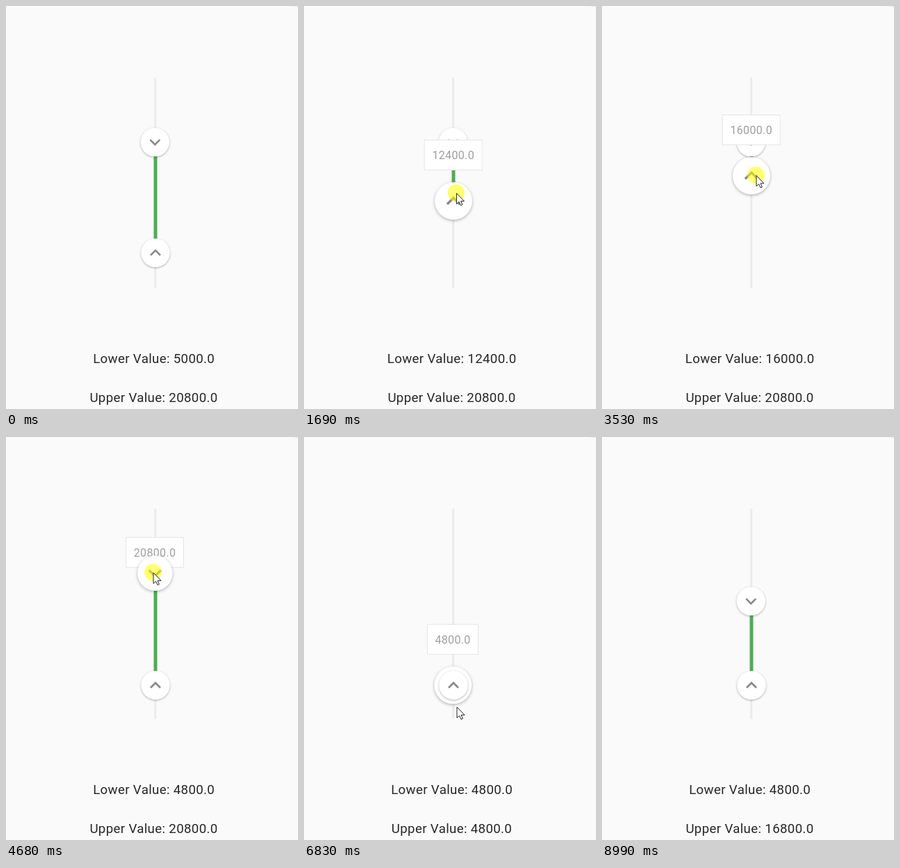
An HTML page for the animation above (9.31 s loop, 420 by 579 pixels).

```html
<!DOCTYPE html>
<html lang="en">
<head>
<meta charset="utf-8">
<title>Vertical range slider</title>
<style>
  html, body { margin: 0; width: 100%; height: 100%; overflow: hidden; background: #fafafa; }
  svg { display: block; width: 420px; height: 579px; }
  text { font-family: Roboto, Arial, sans-serif; text-anchor: middle; letter-spacing: .334px; }
  .label { font-size: 18.7px; fill: #282828; }
  .tip rect { fill: #fff; stroke: #e4e4e4; }
  .tip text { font-size: 16.03px; fill: #9e9e9e; }
  .knob circle { fill: #fff; filter: drop-shadow(0 1.3px 1.8px rgba(0, 0, 0, .3)); }
  .knob path { fill: none; stroke: #8a8a8a; stroke-width: 2.7; }
</style>
</head>
<body>
<svg viewBox="0 0 420 579">
  <path d="M409 0H420V2Z" fill="#eee"/>
  <rect x="213.2" y="103" width="3" height="302" fill="#eaebee"/>
  <rect id="range" x="212.5" width="5" fill="#4caf50"/>
  <g id="upper">
    <g class="tip"><rect y="-21.5" height="43"/><text y="6"></text></g>
    <g class="knob"><circle r="20.7"/><path d="M-7-3.5 0 3.5 7-3.5"/></g>
  </g>
  <g id="lower">
    <g class="tip"><rect y="-21.5" height="43"/><text y="6"></text></g>
    <g class="knob"><circle r="20.7"/><path d="M-7 3.5 0-3.5 7 3.5"/></g>
  </g>
  <text id="lowerLabel" class="label" x="212.7" y="513"></text>
  <text id="upperLabel" class="label" x="212.5" y="569"></text>
  <g id="cursor">
    <circle id="halo" r="12.3" cx="-.5" cy="-.5" fill="#ff0" opacity=".56"/>
    <path d="M0 0V15.5L3.6 12.3 6 17.6 8.4 16.6 6.1 11.4H11Z" fill="#fff" stroke="#222"/>
  </g>
</svg>
<script>
const LOOP = 9310, STEP = 76.84, LAST = 117, LAG = 37;
const $ = id => document.getElementById(id);

// Pointer strokes; each starts where the one before ended
const entry = { x: 352, y: 592 };
const strokes = [
  { from: -60, to: 760, x: 219, y: 355 },
  { from: 1240, to: 2208, x: 220, y: 163 },
  { from: 2620, to: 2850, x: 220, y: 195 },
  { from: 3100, to: 3500, x: 222, y: 243.5 },
  { from: 3540, to: 3910, x: 219, y: 356.5 },
  { from: 4000, to: 4600, x: 212, y: 195 },
  { from: 4850, to: 5300, x: 220, y: 147.5 },
  { from: 5400, to: 6330, x: 220, y: 388 },
  { from: 7120, to: 8070, x: 220, y: 236 },
  { from: 8150, to: 8940, x: 362, y: 600 },
];
const holds = [
  { id: 'lower', down: 810, up: 2610 },
  { id: 'lower', down: 2890, up: 3950 },
  { id: 'upper', down: 4637, up: 6830 },
  { id: 'upper', down: 7330, up: 8130 },
];

const clamp = v => Math.min(1, Math.max(0, v));
const smooth = u => u * u * (3 - 2 * u);
const yOf = value => 405 - value * 302 / 30000;
const valueAt = y => Math.round((405 - y) * 30000 / 302 / 200) * 200;
const heldAt = (t, tail = 0) => holds.find(h => t >= h.down && t < h.up + tail);
const move = (el, x, y, k = 1) => el.setAttribute('transform', `translate(${x} ${y}) scale(${k})`);

function pointerAt(t) {
  let { x, y } = entry;
  for (const s of strokes) {
    const u = smooth(clamp((t - s.from) / (s.to - s.from)));
    x += (s.x - x) * u;
    y += (s.y - y) * u;
  }
  return { x, y };
}

// A held handle trails the pointer and stops at the other handle
function valuesAt(t) {
  const v = { lower: 5000, upper: 20800 };
  for (const { id, down, up } of holds) {
    if (t < down) break;
    const value = valueAt(pointerAt(Math.min(t, up) - LAG).y);
    v[id] = id === 'lower' ? Math.min(value, v.upper) : Math.max(value, v.lower);
  }
  return v;
}

const elasticOut = u => u <= 0 ? 0 : u >= 1 ? 1
  : 1 + 2 ** (-10 * u) * Math.sin((u - .1) * Math.PI * 5);

// Bezier (.4, 0, .2, 1)
function fastOutSlowIn(x) {
  let lo = 0, hi = 1;
  for (let i = 0; i < 20; i++) {
    const m = (lo + hi) / 2;
    if (1.2 * m * (1 - m) ** 2 + .6 * m * m * (1 - m) + m ** 3 < x) lo = m; else hi = m;
  }
  return smooth(lo);
}

// Grows while pressed, runs backwards after release
function swell(id, t) {
  let v = 0, last = 0;
  for (const { down, up } of holds.filter(h => h.id === id && h.down <= t)) {
    v = clamp(v - (down - last) / 700);
    v = clamp(v + (Math.min(t, up) - down) / 700);
    last = up;
  }
  return elasticOut(clamp(v - Math.max(0, t - last) / 700));
}

function drawHandle(id, x, value, t) {
  const [tip, knob] = $(id).children, [box, text] = tip.children;
  const y = yOf(value), label = value.toFixed(1);
  move(knob, x, y, 1 + .3 * swell(id, t));
  // The tooltip outlasts the press by one step
  const hold = heldAt(t, 40), shown = hold && hold.id === id;
  tip.style.display = shown ? '' : 'none';
  if (shown) {
    const w = label.length > 6 ? 83 : 73;
    box.setAttribute('x', -w / 2);
    box.setAttribute('width', w);
    text.textContent = label;
    move(tip, x - .3, y - 18.5 - 47.5 * fastOutSlowIn(clamp((t - hold.down) / 200)));
  }
  $(id + 'Label').textContent = (id === 'lower' ? 'Lower' : 'Upper') + ' Value: ' + label;
  return y;
}

function draw(now) {
  const t = STEP * Math.min(LAST, Math.floor((now % LOOP + 12) / STEP));
  const { lower, upper } = valuesAt(t), tip = pointerAt(t);
  const top = drawHandle('upper', 214.3, upper, t);
  const bottom = drawHandle('lower', 215, lower, t);
  $('range').setAttribute('y', top);
  $('range').setAttribute('height', bottom - top);
  $('cursor').style.display = t > 0 ? '' : 'none';
  $('halo').style.display = heldAt(t) ? '' : 'none';
  move($('cursor'), tip.x, tip.y);
}

const start = performance.now();
function loop() {
  draw(performance.now() - start);
  requestAnimationFrame(loop);
}
loop();
</script>
</body>
</html>
```
